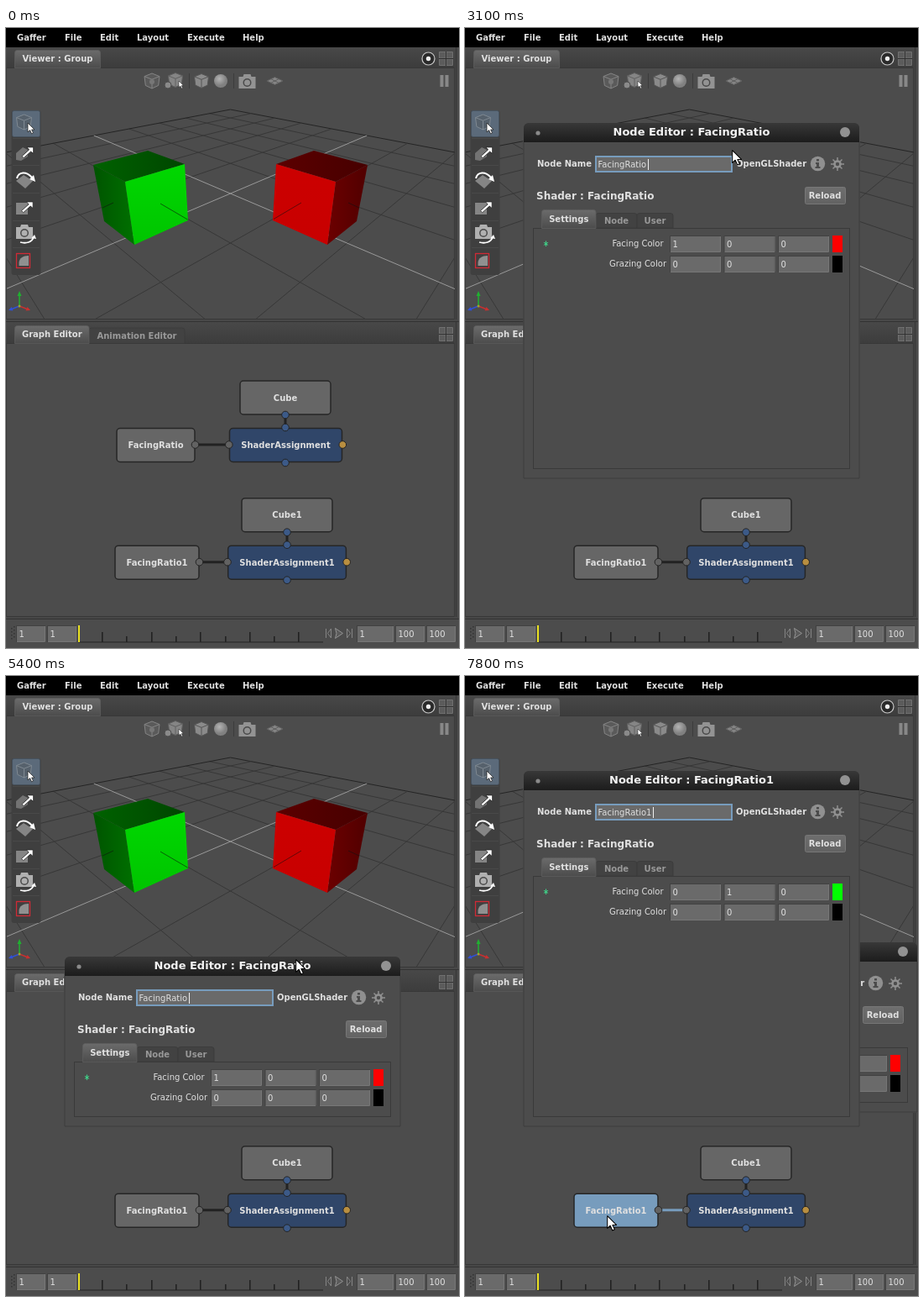
Animation of 540 by 738 pixels, one loop 8000 ms. Source, as an HTML page:

```html
<!DOCTYPE html>
<html lang="en">
<head>
<meta charset="utf-8">
<title>Node editor windows</title>
<style>
  html, body { margin: 0; width: 100%; height: 100%; overflow: hidden; background: #4c4c4c; }
  svg { display: block; width: 540px; height: 738px; }
  text { font: 10px "DejaVu Sans", Verdana, sans-serif; fill: #e0e0e0; white-space: pre; }
  .b { font-weight: bold; }
  .mid { text-anchor: middle; }
  .off { fill: #999; }
  .h1 { font-size: 13px; fill: #f2f2f2; }
  .h2 { font-size: 12px; }
  .sel > rect { fill: #779cbd; }
  .sel > .wire { stroke: #779cbd; }
</style>
</head>
<body>
<svg id="stage" viewBox="0 0 540 738" xmlns="http://www.w3.org/2000/svg"></svg>
<script>
const rect = (x, y, w, h, fill, more = '') =>
  `<rect x="${x}" y="${y}" width="${w}" height="${h}" fill="${fill}" ${more}/>`;
const path = (d, fill, more = '') => `<path d="${d}" fill="${fill}" ${more}/>`;
const line = (d, color, w = 1, more = '') => path(d, 'none', `stroke="${color}" stroke-width="${w}" ${more}`);
const dot = (x, y, r, fill, more = '') => `<circle cx="${x}" cy="${y}" r="${r}" fill="${fill}" ${more}/>`;
const text = (x, y, s, cls = 'b') => `<text x="${x}" y="${y}" class="${cls}">${s}</text>`;
const at = (x, y, body, more = '') => `<g transform="translate(${x} ${y})" ${more}>${body}</g>`;
const grad = (id, a, b, dir = 'x2="0" y2="1"') =>
  `<linearGradient id="${id}" ${dir}><stop stop-color="${a}"/><stop offset="1" stop-color="${b}"/></linearGradient>`;

const defs = `<defs>
  ${grad('tab', '#6b6b6b', '#4c4c4c')}${grad('strip', '#484848', '#3c3c3c')}
  ${grad('bar', '#383838', '#1c1c1c')}${grad('btn', '#6e6e6e', '#626262')}
  ${grad('gTop', '#006200', '#004600', '')}${grad('gSide', '#005400', '#007000', '')}${grad('gFront', '#00d800', '#00c400')}
  ${grad('rTop', '#5c0000', '#460000', '')}${grad('rSide', '#6c0000', '#500000', '')}${grad('rFront', '#cc0000', '#c80000')}
  <radialGradient id="ball" cx=".4" cy=".35"><stop stop-color="#b4b4b4"/><stop offset="1" stop-color="#808080"/></radialGradient>
  <clipPath id="view"><rect x="1" y="48" width="534" height="298"/></clipPath>
  <clipPath id="body"><rect x="69" y="100" width="402" height="437"/></clipPath>
</defs>`;

// Ground grid, seen along its diagonal
function grid() {
  const unit = 0.1226, near = -7.2;
  const project = (i, j) => {
    const depth = 1 + (i + j) * unit;
    return [267.5 + 428 * (i - j) * unit / depth, 15.4 + 181.6 / depth].map(v => v.toFixed(1));
  };
  const seg = (i, swap) => {
    const p = v => project(...(swap ? [v, i] : [i, v]));
    return `M${p(Math.max(-5, near - i))}L${p(5)}`;
  };
  let out = '';
  for (const swap of [false, true])
    for (let i = -5; i <= 5; i++)
      if (i) out += line(seg(i, swap), i === 5 ? '#242424' : '#373737');
  return out + line(seg(0, false) + seg(0, true), '#999');
}

const poly = (points, fill) => `<polygon points="${points}" fill="${fill}"/>`;
const cubes =
  poly('104,163 169,146 213,162 142,183', 'url(#gTop)') +
  poly('104,163 142,183 153,258 117,230', 'url(#gSide)') +
  poly('142,183 213,162 217,229 153,258', 'url(#gFront)') +
  line('M115 214L128 208', '#0a300a') + line('M184 209L216.500 228', '#076007') +
  poly('322,162 367,146 431,163 393,183', 'url(#rTop)') +
  poly('393,183 431,163 418,230 383,258', 'url(#rSide)') +
  poly('322,162 393,183 383,258 318,229', 'url(#rFront)') +
  line('M319 227.500L352 208', '#640808') + line('M408 208L421 214', '#300a0a');

const axes = line('M16 331V318', '#20b030', 1.5) + path('M16 313L13.500 319H18.500Z', '#20b030') +
  line('M16 331L25 334.500', '#c83030', 1.5) + path('M29 336L23.500 336.500L25.500 332Z', '#c83030') +
  line('M16 331L7 334.500', '#3050d8', 1.5) + path('M3 336L6.500 332L8.500 336.500Z', '#3050d8') +
  dot(16, 331, 1.5, '#a0a030');

const pointer = 'M0 0V14L3.300 11L5.800 16.500L8.300 15.300L5.900 10.200H10.300Z';
const smallPointer = (x, y, s) => at(x, y,
  path(pointer, '#fff', `stroke="#222" stroke-width="1" transform="scale(${s})"`));
const box = (x, y, s, fill, edge) => at(x, y,
  path(`M${-s} ${-s * .6}L0 ${-s}L${s} ${-s * .6}L${s * .85} ${s * .6}L0 ${s}L${-s * .85} ${s * .6}Z`, fill, `stroke="${edge}"`) +
  line(`M${-s} ${-s * .6}L0 ${-s * .2}L${s} ${-s * .6}M0 ${-s * .2}V${s}`, edge));
const camera = (x, y, c) => at(x, y,
  path('M-10 -6H-5L-4 -9H4L5 -6H10V8H-10Z', c) + dot(0, 1, 5, '#4a4a4a') + dot(0, 1, 3.500, c));

const topTools = box(174, 63, 9, '#5a5a5a', '#858585') + dot(174, 64, 3, '#777') +
  box(202, 62, 8.5, '#858585', '#606060') + dot(193, 68, 4, '#8a8a8a', 'stroke="#4c4c4c"') +
  smallPointer(206, 63, .55) +
  rect(218, 54, 1, 18, '#3c3c3c') + box(233, 63, 8.5, '#8a8a8a', '#555') + dot(256, 63, 8, 'url(#ball)') +
  rect(271, 54, 1, 18, '#3c3c3c') + camera(287.5, 64, '#939393') +
  path('M311 63L320.500 58.500L330 63L320.500 67.500Z', '#858585', 'stroke="#606060"') +
  line('M316 60.700L325 65.300M325 60.700L316 65.300', '#606060') +
  rect(517.5, 56, 4, 14, '#888') + rect(523.5, 56, 4, 14, '#888');

const arrowUp = path('M-7 6.500L3 -2.500L0 -6H9V3L5.500 0L-4.500 9Z', '#fff', 'stroke="#2a2a2a" transform="scale(.85)"');
const sideTools = rect(6.5, 98, 35, 196, '#3f3f3f', 'rx="3"') +
  rect(7.5, 98.5, 33, 31, '#5b6a7a', 'rx="2" stroke="#46525e"') +
  box(21.5, 112, 9, '#56616c', '#7f8992') + smallPointer(26, 113, .78) +
  [131, 163, 196, 229, 261].map(y => rect(8, y, 32, 1, '#494949')).join('') +
  path('M12 157V149L20 142L26 145V153L18 158Z', '#737373') + at(25, 147, arrowUp) +
  path('M12 182L21 175L32 182L23 191Z', '#858585') +
  line('M13 179C15 171 24 170 31 178', '#fff', 2) + path('M35 183L28 180L33 175Z', '#fff') +
  rect(12, 208, 14, 14, '#858585') + at(24.5, 212, arrowUp) +
  camera(22, 243, '#b0b0b0') + line('M17 255C24 257 31 255 33 249', '#fff', 1.8) + path('M34 246L36 251L30.500 250Z', '#fff') +
  rect(12.5, 268.5, 16, 17, 'none', 'stroke="#d02a35" stroke-width="1.3"') + path('M15.500 283V279C16 274 20 271 27 271V283Z', '#909090');

const gridIcon = (x, y) => rect(x, y, 17, 17, '#707070', 'rx="1"') +
  [1, 9.5].map(i => [1, 9.5].map(j => rect(x + i, y + j, 6.5, 6.5, '#5c5c5c')).join('')).join('') +
  line(`M${x + 8.5} ${y}v17M${x} ${y + 8.5}h17`, '#303030');
const tab = (x, y, w, h, label, live = true) =>
  path(`M${x} ${y + h}V${y + 3}Q${x} ${y} ${x + 3} ${y}H${x + w - 3}Q${x + w} ${y} ${x + w} ${y + 3}V${y + h}Z`,
    live ? 'url(#tab)' : '#424242', `stroke="${live ? '#5d5d5d' : '#3a3a3a'}" stroke-width=".8"`) +
  text(x + w / 2, Math.floor(y + h / 2 + (live ? 3.5 : 4)), label, live ? 'b mid' : 'b mid off');
const field = (x, y, w, h, s) =>
  rect(x + .5, y + .5, w - 1, h - 1, '#6a6a6a', 'stroke="#414141"') +
  line(`M${x + 1} ${y + h - .5}H${x + w - .5}V${y + 1}`, '#777') + text(x + 3.5, y + h / 2 + 4, s, '');

const shell = rect(0, 0, 540, 738, '#3c3c3c') + rect(0, 0, 540, 23, '#000') +
  [[13, 'Gaffer'], [70, 'File'], [112, 'Edit'], [156, 'Layout'], [216, 'Execute'], [282, 'Help']]
    .map(([x, s]) => text(x, 15, s)).join('') +
  rect(0, 23, 540, 25, 'url(#strip)') + rect(0, 350, 540, 27, 'url(#strip)') +
  rect(.5, 47.5, 534, 299, '#4c4c4c', 'stroke="#383838"') +
  rect(.5, 375.5, 534, 325, '#4c4c4c', 'stroke="#383838"') +
  rect(535, 23, 5, 681, '#484848') + rect(536, 23, 1, 681, '#353535') +
  rect(0, 347, 540, 3, '#484848') + rect(0, 349, 540, 1, '#333') +
  tab(10.5, 26.5, 102, 21, 'Viewer : Group') +
  tab(99, 357, 114, 18.5, 'Animation Editor', false) + tab(10.5, 354.5, 88.5, 21, 'Graph Editor') +
  dot(503.5, 36.5, 7.5, '#2a2a2a', 'stroke="#c8c8c8" stroke-width="1.2"') + dot(503.5, 36.5, 2.7, '#eee') +
  gridIcon(516, 28) + gridIcon(516, 356);

const ticks = Array.from({length: 9}, (_, i) =>
  rect(Math.round(115 + i * 29.3) - 1, i % 2 ? 724 : 719, 1.6, i % 2 ? 7 : 12, '#222')).join('');
const timeline = rect(0, 701, 540, 37, '#484848') + rect(0, 703, 540, 1, '#333') + rect(0, 704, 540, 34, '#4c4c4c') +
  [714, 718, 722, 726].map(y => rect(6, y, 1.5, 1.5, '#333') + rect(9, y - 2, 1.5, 1.5, '#333')).join('') +
  field(12, 711, 35, 20, '1') + field(49, 711, 35, 20, '1') +
  rect(86, 730.5, 292, 1, '#222') + ticks + rect(86, 711, 2, 20, '#e8e020') +
  line('M381.500 715V726M387.500 715L383.500 720.500L387.500 726Z', '#858585') +
  path('M392.500 714.500L401.500 720.500L392.500 726.500L394 720.500Z', '#5a5a5a', 'stroke="#929292"') +
  line('M412.500 715V726M406.500 715L410.500 720.500L406.500 726Z', '#858585') +
  field(418, 711, 44, 20, '1') + field(464, 711, 35, 20, '100') + field(501, 711, 35, 20, '100');

const node = (x, y, w, label, fill = '#666') =>
  rect(x, y, w, 40, fill, 'rx="4" stroke="#262626" stroke-width="1.5"') + text(x + w / 2, y + 23.5, label, 'b mid');
const plug = (x, y, fill) => dot(x, y, 4.3, fill, 'stroke="#242424"');
function chain(id, y, cube, shader, assign, names) {
  const [cx, cw] = cube, [fx, fw] = shader, [ax, aw] = assign;
  const mid = cx + cw / 2, row = y + 56.5, mouth = row + 19.5, blue = '#3c5a88';
  return `<g id="${id}">` + line(`M${fx + fw} ${mouth}H${ax}`, '#222', 3, 'class="wire"') +
    node(fx, row, fw, names[1]) + '</g>' +
    line(`M${mid} ${y + 41}V${row}`, '#222', 3) + node(cx, y, cw, names[0]) +
    node(ax, row, aw, names[2], '#304669') +
    plug(mid, y + 40.5, blue) + plug(mid, row - 1, blue) + plug(mid, row + 41, blue) +
    plug(fx + fw + .5, mouth, '#626262') + plug(ax - .7, mouth, '#626262') + plug(ax + aw + .8, mouth, '#b88e40');
}
const graph =
  chain('n0', 420, [279, 108], [132, 93], [266.5, 134], ['Cube', 'FacingRatio', 'ShaderAssignment']) +
  chain('n1', 559.7, [281, 108], [130, 100], [264.7, 140.7], ['Cube1', 'FacingRatio1', 'ShaderAssignment1']);

const titleBar = name => path('M70 136V120Q70 113 77 113H463Q470 113 470 120V136Z', 'url(#bar)') +
  dot(87, 125, 2.6, '#8a8a8a') + dot(453, 124, 6, '#929292') +
  text(270, 128, `Node Editor : ${name}`, 'b h1 mid');
const gear = at(444, 162, line('M0 -8V8M-8 0H8M-5.500 -5.500L5.500 5.500M-5.500 5.500L5.500 -5.500', '#909090', 1.5) +
  dot(0, 0, 4.8, '#909090') + dot(0, 0, 2.2, '#4c4c4c'));
const colorRow = (y, label, values, swatch) => text(206, y + 13, label, 'mid') +
  values.map((v, i) => field(244 + i * 64.5, y, 61, 20, v)).join('') + rect(438, y, 12, 20, swatch);

function editor(id, name, values, swatch, caretX) {
  return `<g id="${id}"><g clip-path="url(#body)">
    <g class="ghost">${rect(69.5, 130, 401, 420, '#4c4c4c')}${titleBar(name)}</g>
    <g class="main">${rect(69.5, 130, 401, 420, '#4c4c4c')}${titleBar(name)}
      ${text(86, 165, 'Node Name')}${field(155, 152, 164, 20, name)}
      <g class="focus">${rect(156, 153, 162, 18, 'none', 'stroke="#779cbd" stroke-width="2"')}</g>
      <g class="caret">${rect(caretX, 156, 1, 13, '#f0f0f0')}</g>
      ${text(323, 165, 'OpenGLShader')}${dot(420.5, 161.5, 8.7, '#909090')}
      ${rect(419, 156, 3, 2.5, '#4c4c4c')}${path('M418 160H422V165H423.500V167H417.500V165H419V162H418Z', '#4c4c4c')}${gear}
      ${text(85, 204, 'Shader : FacingRatio', 'b h2')}
      ${rect(405.5, 189.5, 48, 20, 'url(#btn)', 'rx="2" stroke="#777"')}${text(429, 203, 'Reload', 'b mid')}
      <rect class="pane" x="81.5" y="238.5" width="377" fill="none" stroke="#3a3a3a"/>
      ${tab(156, 220.5, 49, 17.500, 'Node', false)}${tab(205, 220.5, 43, 17.500, 'User', false)}${tab(91.5, 216.5, 64.5, 22, 'Settings')}
      ${line('M96.500 253.500V260M94 255.200L99 258.500M99 255.200L94 258.500', '#3fd68a')}
      ${colorRow(247, 'Facing Color', values, swatch)}${colorRow(271, 'Grazing Color', [0, 0, 0], '#000')}
    </g>
    <path class="edge" fill="none" stroke="#3d3d3d"/>
  </g></g>`;
}

const pointers = `<g id="arrow">${at(.7, .7, path(pointer, '#fff', 'stroke="#000" stroke-linejoin="round" transform="scale(1.05)"'))}</g>
  <g id="resize">${path('M-8 -1.500H8V2H4L6.500 8H2.500V16H-1.500V8H-5.500L-2 2H-8Z', '#000')}
    ${rect(-7, -.5, 14, 1.8, '#fff')}${path('M.5 2.500L5 7.200H1.700V15H-.700V7.200H-4Z', '#fff')}</g>
  <g id="hand">${path('M-5 6.500V3L-7.500 0V-3H-5V-5.500Q-3.500 -7 -2 -6Q0 -7.500 1.500 -6Q3.500 -7 4.500 -5.500Q7 -6 7 -3V1L5.500 4V6.500Z',
    '#fff', 'stroke="#111" stroke-width="1.100"')}${line('M-2 -5V-2.500M1.300 -5V-2.500M4.300 -4.500V-2.500', '#333', .9)}</g>`;

const stage = document.getElementById('stage');
stage.innerHTML = defs + shell + `<g clip-path="url(#view)">${grid()}${cubes}</g>` +
  axes + topTools + sideTools + graph + timeline +
  editor('w0', 'FacingRatio', [1, 0, 0], '#f00', 218) +
  editor('w1', 'FacingRatio1', [0, 1, 0], '#0f0', 224) + pointers;

// Key tables: time, then values
const pathKeys = [
  [100, 93, 726], [500, 130, 590], [700, 149, 525], [900, 159, 497],
  [2300, 159, 497], [2500, 178, 450], [2900, 302, 200], [3100, 318, 145], [3200, 322, 134],
  [3900, 336, 113], [4100, 338, 113], [4400, 343, 205], [4700, 344, 300], [5000, 344, 332],
  [5100, 345, 337], [5400, 345, 337], [5500, 346, 342], [5600, 346, 342], [6400, 400, 322], [6700, 402, 322],
  [6800, 385, 340], [7000, 290, 480], [7300, 150, 645], [7400, 152, 652], [7500, 169, 642]];
const sizeKeys = [[4100, 0, 0], [4400, 65, 82], [4700, 165, 178], [4900, 207, 213], [5000, 215, 218], [5100, 221, 221]];
const dragKeys = [[5600, 0, 0], [5800, 10, -2], [6200, 57, -15], [6400, 67, -18], [6600, 67, -18], [6700, 69, -17]];

function sample(keys, t) {
  if (t <= keys[0][0]) return keys[0].slice(1);
  const i = keys.findIndex(k => k[0] >= t);
  if (i < 0) return keys[keys.length - 1].slice(1);
  const a = keys[i - 1], b = keys[i], p = (t - a[0]) / (b[0] - a[0]);
  return a.slice(1).map((v, n) => Math.round(v + (b[n + 1] - v) * p));
}

const $ = id => document.getElementById(id);
const show = (el, on) => el.setAttribute('display', on ? 'inline' : 'none');
const move = (el, x, y) => el.setAttribute('transform', `translate(${x} ${y})`);
const within = (t, a, b) => t >= a && t < b;

function pose(id, open, frame, inner, pane, drag, focus, caret) {
  const w = $(id), part = c => w.querySelector('.' + c);
  show(w, open);
  move(w, ...drag);
  move(part('ghost'), 0, frame);
  move(part('main'), 0, inner);
  part('pane').setAttribute('height', pane);
  part('edge').setAttribute('d', `M70 ${frame + 136}V536H470V${frame + 136}`);
  show(part('focus'), focus);
  show(part('caret'), focus && caret);
}

function render(t) {
  const [frame, inner] = sample(sizeKeys, t);
  const blink = t >= 5400 || Math.floor((t - 1700) / 500) % 2 === 0;
  pose('w0', t >= 1700, frame, inner, t < 5100 ? 286 : 65, sample(dragKeys, t),
    within(t, 1700, 4200) || within(t, 5400, 5500), blink);
  pose('w1', t >= 7700, 0, 0, 286, [0, 0], t >= 7800, true);
  $('n0').classList.toggle('sel', within(t, 1600, 7600));
  $('n1').classList.toggle('sel', t >= 7600);

  const kind = within(t, 4200, 5100) ? 'resize' : within(t, 5500, 6800) ? 'hand' : 'arrow';
  const [x, y] = sample(pathKeys, t);
  for (const id of ['arrow', 'resize', 'hand']) {
    show($(id), id === kind && t >= 100);
    move($(id), x, y);
  }
}

const start = performance.now();
let last = -1;
function tick() {
  const t = Math.floor((performance.now() - start) % 8000 / 100) * 100;
  if (t !== last) render(last = t);
  requestAnimationFrame(tick);
}
tick();
</script>
</body>
</html>
```
